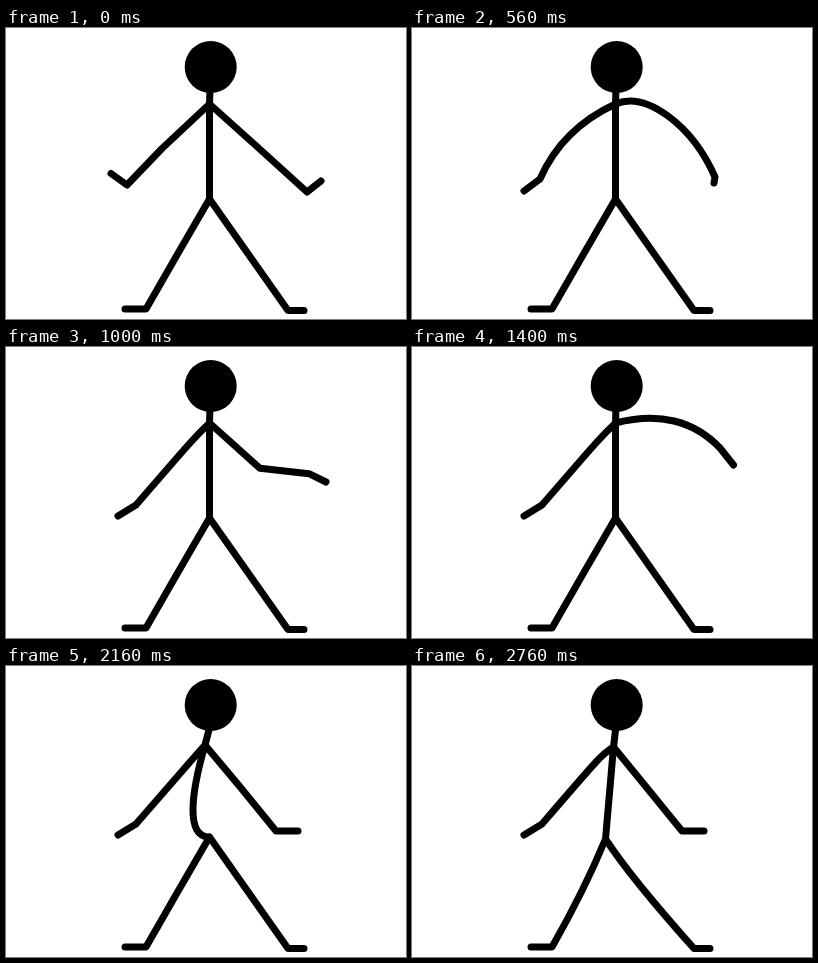
Recreate the animation shown at these times as an HTML page. Size 400 px wide and 291 px high, loop 2.8 s.

```html
<!DOCTYPE html>
<html lang="en">
<head>
<meta charset="utf-8">
<title>Stick figure</title>
<style>
  html, body { margin: 0; width: 100%; height: 100%; overflow: hidden; background: #fff; }
  svg { display: block; width: 100vw; height: 100vh; }
  path { fill: none; stroke: #000; stroke-width: 7; stroke-linecap: round; stroke-linejoin: round; }
</style>
</head>
<body>
<svg viewBox="0 0 400 291">
  <circle cx="204.7" cy="39" r="26"/>
  <path id="figure"/>
</svg>
<script>
const LOOP = 2800, STEP = 40;

const ramp = (t, start, end) => Math.min(1, Math.max(0, (t - start) / (end - start)));
const mix = (a, b, p) => a + (b - a) * p;
const mixPoint = (a, b, p) => [mix(a[0], b[0], p), mix(a[1], b[1], p)];
const add = (a, b, scale = 1) => [a[0] + b[0] * scale, a[1] + b[1] * scale];

// Curl rounds the arm at its elbow; 0 leaves a sharp corner.
const pose = (time, elbow, wrist, hand, curl = 0) => ({ time, joints: [elbow, wrist, hand], curl });

const leftPoses = [
  pose(0, [156, 120.5], [121, 157], [105, 145.5]),
  pose(560, [158, 107], [128, 151], [112, 163], .25),
  pose(680, [184, 96], [130, 158], [112, 169], .13)
];
const rightPoses = [
  pose(0, [252, 119.5], [301, 164], [315, 153]),
  pose(560, [256, 88], [303, 149], [302, 155], .3),
  pose(1000, [254, 122], [303, 127], [320, 135]),
  pose(1400, [262, 74], [308, 101], [321.5, 118], .25),
  pose(1840, [250, 118], [280, 163], [303, 163], .1),
  pose(2040, [235, 122], [270, 165], [292, 165])
];

// Blends the two nearest poses; each joint also moves by its weight times the sway.
function armPath(shoulder, poses, t, sway, weights) {
  const from = poses.findLast(p => p.time <= t);
  const to = poses.find(p => p.time > t) || from;
  const p = from === to ? 0 : ramp(t, from.time, to.time);
  const [elbow, wrist, hand] = from.joints.map((joint, i) =>
    add(mixPoint(joint, to.joints[i], p), sway, weights[i]));
  const reach = add(wrist, shoulder, -1);
  const curl = mix(from.curl, to.curl, p);
  return `M${shoulder}Q${add(elbow, reach, -curl)} ${elbow}` +
    `Q${add(elbow, reach, curl)} ${wrist}L${hand}`;
}

const figure = document.getElementById('figure');

function draw(now) {
  const t = Math.floor(now % LOOP / STEP) * STEP;
  const lean = ramp(t, 1880, 2160), shift = ramp(t, 2160, 2760), bow = lean - shift;
  const wave = Math.sin(Math.PI * ramp(t, 0, 560));
  const hop = Math.sin(2 * Math.PI * ramp(t, 560, 1400)) ** 2;

  const shoulder = [203.5 - 4.5 * lean + 2.5 * shift, 76 + 3 * lean + 2 * shift];
  const hip = [203.5 - 10 * shift, 171 + 2 * shift];
  const knee = [243 - 24 * shift, 227 - 15 * shift];
  const upperSpine = add(mixPoint(shoulder, hip, 1 / 3), [-15, 16], bow);
  const lowerSpine = add(mixPoint(shoulder, hip, 2 / 3), [-23, 31], bow);

  figure.setAttribute('d',
    `M204 60L${shoulder}C${upperSpine} ${lowerSpine} ${hip}` +
    armPath(shoulder, leftPoses, t, [-48 * wave, -113 * wave], [.3, .7, 1]) +
    armPath(shoulder, rightPoses, t, [0, -30 * hop], [1, .5, 0]) +
    `M${hip}Q172 225 140 281H119M${hip}Q${knee} 282 282.5H298`);
  requestAnimationFrame(draw);
}
draw(0);
</script>
</body>
</html>
```
